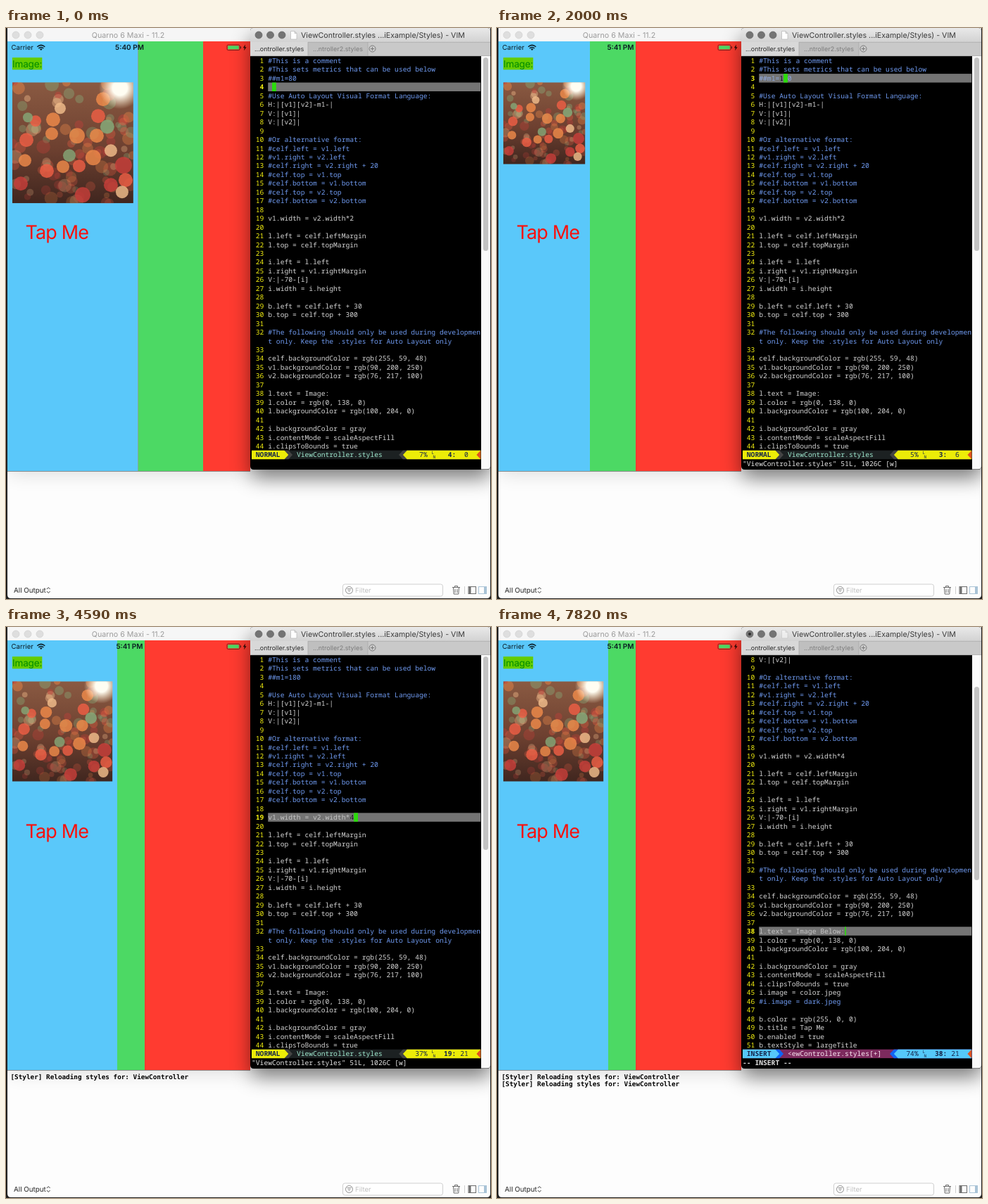
Animation, 689 px wide and 812 px high, one loop 8000 ms. Source, as an HTML page:

```html
<!DOCTYPE html>
<html lang="en">
<head>
<meta charset="utf-8">
<title>Live style reload</title>
<style>
  html, body { margin: 0; width: 100%; height: 100%; overflow: hidden; background: #1e1e1e; }
  svg { display: block; width: 689px; height: 812px; }
  text { white-space: pre; text-rendering: geometricPrecision; font-family: Inter, "Open Sans", sans-serif; }
  .code text { font: 9.68px "Noto Sans Mono", monospace; }
  .code .b { font-weight: 700; }
  #log text { font: bold 9.34px "DejaVu Sans Mono", monospace; }
</style>
</head>
<body>
<svg viewBox="0 0 689 812">
  <defs>
    <linearGradient id="bar" x2="0" y2="1"><stop stop-color="#e9e9e9"/><stop offset="1" stop-color="#d2d2d2"/></linearGradient>
    <linearGradient id="base" x2="0" y2="1"><stop stop-color="#8a5a42"/><stop offset=".55" stop-color="#6d4030"/><stop offset="1" stop-color="#40261f"/></linearGradient>
    <radialGradient id="glow"><stop offset=".35" stop-color="#fffdf2"/><stop offset="1" stop-color="#fff0cc" stop-opacity="0"/></radialGradient>
    <filter id="blur" x="-30%" y="-30%" width="160%" height="160%"><feGaussianBlur stdDeviation="14"/></filter>
    <clipPath id="frame"><rect width="172" height="172"/></clipPath>
    <clipPath id="desk"><path d="M2 0H688V806Q688 811 683 811H7Q2 811 2 806Z"/></clipPath>
  </defs>

  <g clip-path="url(#desk)">
    <rect width="689" height="812" fill="#fdfdfd"/>
    <rect x="4" y="22" width="341" height="612" opacity=".13" filter="url(#blur)"/>
    <g id="log"></g>

    <!-- console footer -->
    <text x="11" y="803" font-size="9.8" fill="#222">All Output</text>
    <path d="M58 798l2.3-2.5 2.3 2.5M58 801l2.3 2.5 2.3-2.5" fill="none" stroke="#444"/>
    <rect x="478.5" y="791" width="142" height="17" rx="3" fill="#fff" stroke="#cfcfcf"/>
    <g fill="none" stroke="#8b8b8b">
      <circle cx="487.5" cy="799.5" r="5"/>
      <path d="M484.5 797.5h6M485.5 799.5h4M486.5 801.5h2" stroke-width=".9"/>
    </g>
    <text x="496" y="803" font-size="9.6" fill="#c0c0c0">Filter</text>
    <g fill="none" stroke="#6c6c6c">
      <path d="M634 795.5h11M637.5 795v-1.5h4v1.5M635.5 796l.7 9h6.6l.7-9M638 798v5M641 798v5"/>
      <path d="M651.5 794v11" stroke="#cfcfcf"/>
      <rect x="657" y="794.5" width="10.5" height="10"/>
      <path d="M659 795v9" stroke-width="3"/>
      <rect x="671.5" y="794.5" width="11" height="10" stroke="#a9c3d6"/>
      <path d="M680.5 795v9" stroke="#a9c3d6" stroke-width="3"/>
    </g>

    <!-- simulator -->
    <path d="M2 19V4Q2 0 6 0H347V19Z" fill="#f6f6f6"/>
    <g fill="#dedede" stroke="#d0d0d0" stroke-width=".7">
      <circle cx="14" cy="10" r="5"/><circle cx="31" cy="10" r="5"/><circle cx="48" cy="10" r="5"/>
    </g>
    <text x="173.5" y="14" font-size="10.7" text-anchor="middle" fill="#9b9b9b">Quarno 6 Maxi - 11.2</text>
    <rect x="2" y="19" width="345" height="611.5" fill="#ff3b30"/>
    <rect id="v2" y="19" height="611.5" fill="#4cd964"/>
    <rect id="v1" x="2" y="19" height="611.5" fill="#5ac8fa"/>
    <path d="M2 630.5H347" stroke="#8d8d8d"/>
    <text x="7.5" y="31.3" font-size="9.6" fill="#0b1a22">Carrier</text>
    <g fill="none" stroke="#0b1a22" stroke-width="1.5">
      <path d="M44.3 26.7Q49.8 22 55.3 26.7M46.3 28.9Q49.8 26 53.3 28.9"/>
      <path d="M49.8 32L48 30Q49.8 28.6 51.6 30Z" fill="#0b1a22" stroke="none"/>
    </g>
    <text id="clock" x="175.5" y="31.3" font-size="10" font-weight="600" text-anchor="middle" fill="#0b1a22"></text>
    <rect x="314" y="24" width="18" height="7.5" rx="1.5" fill="none" stroke="#5a1c18" stroke-width=".8"/>
    <rect x="315.2" y="25.2" width="15.6" height="5.1" rx=".6" fill="#4cd964"/>
    <path d="M333.4 26.3v3" stroke="#5a1c18" stroke-width="1.2"/>
    <path d="M340 23.5l-3.2 4.8h2l-.8 3.9 3.6-5h-2.1z" fill="#2a0a08"/>
    <rect x="9" y="42" width="42.3" height="17.3" fill="#64cc00"/>
    <text x="9" y="55.8" font-size="13.6" letter-spacing="-.2" fill="#008a00">Image:</text>
    <g id="photo"></g>
    <text x="27.5" y="300" font-size="27" letter-spacing="-.9" fill="#f9110d">Tap Me</text>

    <!-- editor window -->
    <rect x="348" y="14" width="340" height="626" opacity=".52" filter="url(#blur)"/>
    <path d="M347 628V4Q347 0 351 0H684Q688 0 688 4V623Q688 628 683 628H352Q347 628 347 623Z" fill="#000"/>
    <path d="M347 20V4Q347 0 351 0H684Q688 0 688 4V20Z" fill="url(#bar)"/>
    <g fill="#747474" stroke="#636363" stroke-width=".7">
      <circle cx="359" cy="10" r="5"/><circle cx="375.5" cy="10" r="5"/><circle cx="392" cy="10" r="5"/>
    </g>
    <circle id="dirty" cx="359" cy="10" r="2" fill="#2b2b2b"/>
    <path id="doc" d="M404.5 4.5h5.5l3 3v8.5h-8.5zM410 4.5v3h3" fill="#fff" stroke="#b5b5b5" stroke-width=".7"/>
    <text x="419" y="14" font-size="10.64" fill="#3b3b3b">ViewController.styles ...iExample/Styles) - VIM</text>
    <rect x="347" y="20" width="341" height="20" fill="#c9c9c9"/>
    <rect x="347" y="20" width="82" height="20" fill="#d8d8d8"/>
    <rect x="429" y="20" width="85" height="20" fill="#bfbfbf"/>
    <path d="M429 20v20M514 20v20M429 20.3H688M347 39.7H688" stroke="#a8a8a8" stroke-width=".7"/>
    <text x="353" y="33.3" font-size="9" fill="#2a2a2a">...ontroller.styles</text>
    <text x="436" y="33.3" font-size="9" fill="#7d7d7d">...ntroller2.styles</text>
    <g fill="none" stroke="#7b7b7b"><circle cx="520.5" cy="29.5" r="4.5"/><path d="M518 29.5h5M520.5 27v5"/></g>
    <path d="M675 40H688V623Q688 627.5 683 627.5H675Z" fill="#fafafa"/>
    <rect id="thumb" x="678" width="7" height="275" rx="3.5" fill="#c2c2c2"/>
    <g id="screen" class="code"></g>
  </g>
</svg>

<script>
const $ = id => document.getElementById(id);
const CW = 5.808, RH = 12.455, LEFT = 349, TOP = 40.2, LOOP = 8000;
const colX = c => LEFT + c * CW;
const rowY = r => TOP + r * RH;
const esc = s => s.replace(/&/g, '&amp;').replace(/</g, '&lt;');
const box = (x, y, w, h, fill) => `<rect x="${x}" y="${y}" width="${w}" height="${h}" fill="${fill}"/>`;
const poly = (pts, fill) => `<polygon points="${pts}" fill="${fill}"/>`;
const put = (col, row, s, fill, bold) =>
  `<text x="${colX(col)}" y="${rowY(row) + 9.8}" fill="${fill}"${bold ? ' class="b"' : ''}>${esc(s)}</text>`;

const source = s => `#This is a comment
#This sets metrics that can be used below
##m1=${s.m1}

#Use Auto Layout Visual Format Language:
H:|[v1][v2]-m1-|
V:|[v1]|
V:|[v2]|

#Or alternative format:
#celf.left = v1.left
#v1.right = v2.left
#celf.right = v2.right + 20
#celf.top = v1.top
#celf.bottom = v1.bottom
#celf.top = v2.top
#celf.bottom = v2.bottom

v1.width = v2.width*${s.mul}

l.left = celf.leftMargin
l.top = celf.topMargin

i.left = l.left
i.right = v1.rightMargin
V:|-70-[i]
i.width = i.height

b.left = celf.left + 30
b.top = celf.top + 300

#The following should only be used during development only. Keep the .styles for Auto Layout only

celf.backgroundColor = rgb(255, 59, 48)
v1.backgroundColor = rgb(90, 200, 250)
v2.backgroundColor = rgb(76, 217, 100)

l.text = ${s.label}
l.color = rgb(0, 138, 0)
l.backgroundColor = rgb(100, 204, 0)

i.backgroundColor = gray
i.contentMode = scaleAspectFill
i.clipsToBounds = true
i.image = color.jpeg
#i.image = dark.jpeg

b.color = rgb(255, 0, 0)
b.title = Tap Me
b.enabled = true
b.textStyle = largeTitle`.split('\n');

// Each step overrides part of the running state.
const saved = '"ViewController.styles" 51L, 1026C [w]';
const insert = '-- INSERT --';
const steps = [
  [0, { time: '5:40 PM', line: 4, col: 0, ins: false, mod: false, cmd: '', typing: false, cur: 'block',
        m1: 80, mul: 2, label: 'Image:', v1: 185.5, both: 278, logs: 0, top: 0 }],
  [530, { line: 3, col: 1 }],
  [590, { col: 3 }],
  [650, { col: 6 }],
  [880, { time: '5:41 PM' }],
  [1060, { ins: true, cmd: insert }],
  [1180, { m1: 180, col: 7, mod: true }],
  [1470, { ins: false, col: 6, cmd: '' }],
  [1650, { cmd: ':', typing: true }],
  [1760, { cmd: ':w' }],
  [2000, { cmd: saved, typing: false, mod: false, v1: 130, both: 195 }],
  [2060, { logs: 1 }],
  [2470, { cmd: ':', typing: true }],
  [2650, { cmd: ':1' }],
  [2760, { cmd: ':19' }],
  [3000, { line: 19, col: 1, typing: false }],
  [3530, { col: 21 }],
  [3940, { cur: 'low' }],
  [4060, { cur: 'block', mul: 4, mod: true }],
  [4290, { cmd: ':', typing: true }],
  [4410, { cmd: ':w' }],
  [4590, { cmd: saved, typing: false, mod: false, v1: 156 }],
  [4650, { logs: 2 }],
  [5120, { cmd: ':', typing: true }],
  [5410, { cmd: ':3' }],
  [5470, { cmd: ':38' }],
  [5710, { line: 38, col: 1, top: 7, typing: false }],
  [6240, { cur: 'off' }],
  [6410, { cur: 'block' }],
  [6710, { cur: 'off' }],
  [6880, { cur: 'block', col: 15 }],
  [7120, { ins: true, cmd: insert }],
  [7240, { label: 'Image :', col: 16, mod: true }],
  [7410, { label: 'Image B:', col: 17 }],
  [7590, { label: 'Image Be:', col: 18 }],
  [7670, { label: 'Image Bel:', col: 19 }],
  [7740, { label: 'Image Belo:', col: 20 }],
  [7820, { label: 'Image Below:', col: 21 }]
];
let last = {};
const states = steps.map(([, change]) => last = { ...last, ...change });

function cursor(s, row, ch) {
  const x = colX(3.995 + Math.max(1, s.col)), y = rowY(row), green = '#2bdc0c';
  if (s.ins) return box(x, y, 1.6, RH, green);
  if (s.cur === 'low') return box(x, y + RH * .8, CW, RH * .2, green);
  return box(x, y, CW, RH, green) + put(3 + Math.max(1, s.col), row, ch, '#000');
}

function buffer(s) {
  let out = '', row = -s.top;
  source(s).forEach((text, i) => {
    const here = i + 1 === s.line, comment = text[0] === '#';
    const parts = text.match(/.{1,52}/g) || [''];
    parts.forEach((part, k) => {
      if (row >= 0 && row < 45) {
        if (here) out += box(colX(4), rowY(row), 302, RH, '#747474');
        if (!k) out += put(0, row, String(i + 1).padStart(3), '#f2ee10', here);
        const ink = comment ? (here ? '#8ea9e0' : '#6f9af0') : (here ? '#c6c6c6' : '#d4d4d4');
        out += put(4, row, part, ink);
        if (here && !s.typing && s.cur !== 'off')
          out += cursor(s, row, part[Math.max(0, s.col - 1)] || '').replace(/x="[\d.]+"/, m => m);
      }
      row++;
    });
  });
  return out;
}

function status(s) {
  const [a, b, c, ink] = s.ins ? ['#55c8fa', '#1064f4', '#182a5c', '#fff'] : ['#ecec08', '#444', '#1c2122', '#a0ead0'];
  const y = rowY(45), m = y + RH / 2, e = y + RH;
  const right = (k, body, tip, fill) => poly(`${colX(k)},${y} ${colX(body)},${y} ${colX(tip)},${m} ${colX(body)},${e} ${colX(k)},${e}`, fill);
  const dark = '#16264a';
  const percent = Math.floor(s.line * 100 / 51) + '%';
  return box(LEFT, y, 325.5, RH, s.mod ? '#7d2a5e' : c)
    + right(8, 9, 10, b) + right(0, 8, 9, a)
    + right(56, 37, 36, b) + right(56, 38, 37, a)
    + poly(`${colX(55)},${m} ${colX(56)},${y} ${colX(56)},${e}`, '#e0511f')
    + put(1, 45, s.ins ? 'INSERT' : 'NORMAL', dark, true)
    + put(11, 45, s.mod ? '<ewController.styles[+]' : 'ViewController.styles', s.mod ? '#fbe9f3' : ink)
    + put(39, 45, percent.padStart(4), dark)
    + `<g fill="${dark}"><text x="604.6" y="${y + 5.8}" style="font-size:6px">L</text><text x="606.4" y="${y + 11}" style="font-size:6px">N</text></g>`
    + put(47, 45, String(s.line).padStart(2) + ':', dark, true)
    + put(51, 45, String(s.col).padStart(2), dark);
}

function command(s) {
  return put(0, 46, s.cmd, '#e4e4e4', s.ins)
    + (s.typing ? box(colX(s.cmd.length), rowY(46), CW, RH, '#2bdc0c') : '');
}

function drawPhoto() {
  const tones = ['#f08a4a', '#ee5f45', '#c93f3a', '#86a777', '#f2bd8c'];
  // x, y, radius, tone
  const spots = [
    [129, 24, 10, 0], [122, 48, 10, 1], [58, 53, 10, 0], [20, 82, 10, 1], [56, 73, 9, 0], [92, 76, 11, 0],
    [120, 76, 10, 0], [68, 37, 8, 4], [135, 63, 10, 3], [81, 104, 9, 3], [18, 111, 9, 0], [49, 126, 10, 1],
    [72, 120, 9, 0], [95, 119, 9, 1], [115, 107, 11, 0], [140, 97, 9, 4], [158, 118, 12, 2], [161, 139, 10, 1],
    [140, 146, 10, 2], [12, 144, 10, 2], [100, 160, 11, 2], [33, 55, 8, 1], [22, 50, 7, 3], [156, 156, 9, 4]
  ];
  let seed = 11;
  const rnd = () => (seed = seed * 16807 % 2147483647) / 2147483647;
  const dot = (x, y, r, tone, o) => `<circle cx="${x}" cy="${y}" r="${r}" fill="${tones[tone]}" opacity="${o}"/>`;
  let out = '<rect width="172" height="172" fill="url(#base)"/>';
  for (let i = 0; i < 90; i++) {
    const y = rnd() * 172;
    out += dot(rnd() * 172, y, 4 + rnd() * 6, Math.floor(rnd() * 5), .2 + (1 - y / 172) * .25);
  }
  out += spots.map(([x, y, r, tone]) => dot(x, y, r, tone, .82)).join('');
  out += '<circle cx="153" cy="8" r="30" fill="url(#glow)"/>';
  $('photo').innerHTML = `<g clip-path="url(#frame)">${out}</g>`;
}

function render(s) {
  $('clock').textContent = s.time;
  $('v1').setAttribute('width', s.v1);
  $('v2').setAttribute('x', 2 + s.v1);
  $('v2').setAttribute('width', s.both - s.v1);
  $('photo').setAttribute('transform', `translate(9 77.3) scale(${(s.v1 - 13.6) / 172})`);
  $('dirty').style.display = s.mod ? '' : 'none';
  $('doc').style.opacity = s.mod ? .5 : 1;
  $('thumb').setAttribute('y', s.top ? 85 : 42);
  $('log').innerHTML = [0, 1].slice(0, s.logs).map(i =>
    `<text x="6.5" y="${642.6 + i * 10.8}">[Styler] Reloading styles for: ViewController</text>`).join('');
  $('screen').innerHTML = buffer(s) + status(s) + command(s);
}

let shown = -1;
function tick() {
  const t = performance.now() % LOOP;
  let i = steps.length - 1;
  while (steps[i][0] > t) i--;
  if (i !== shown) render(states[shown = i]);
  requestAnimationFrame(tick);
}
drawPhoto();
tick();
</script>
</body>
</html>
```
